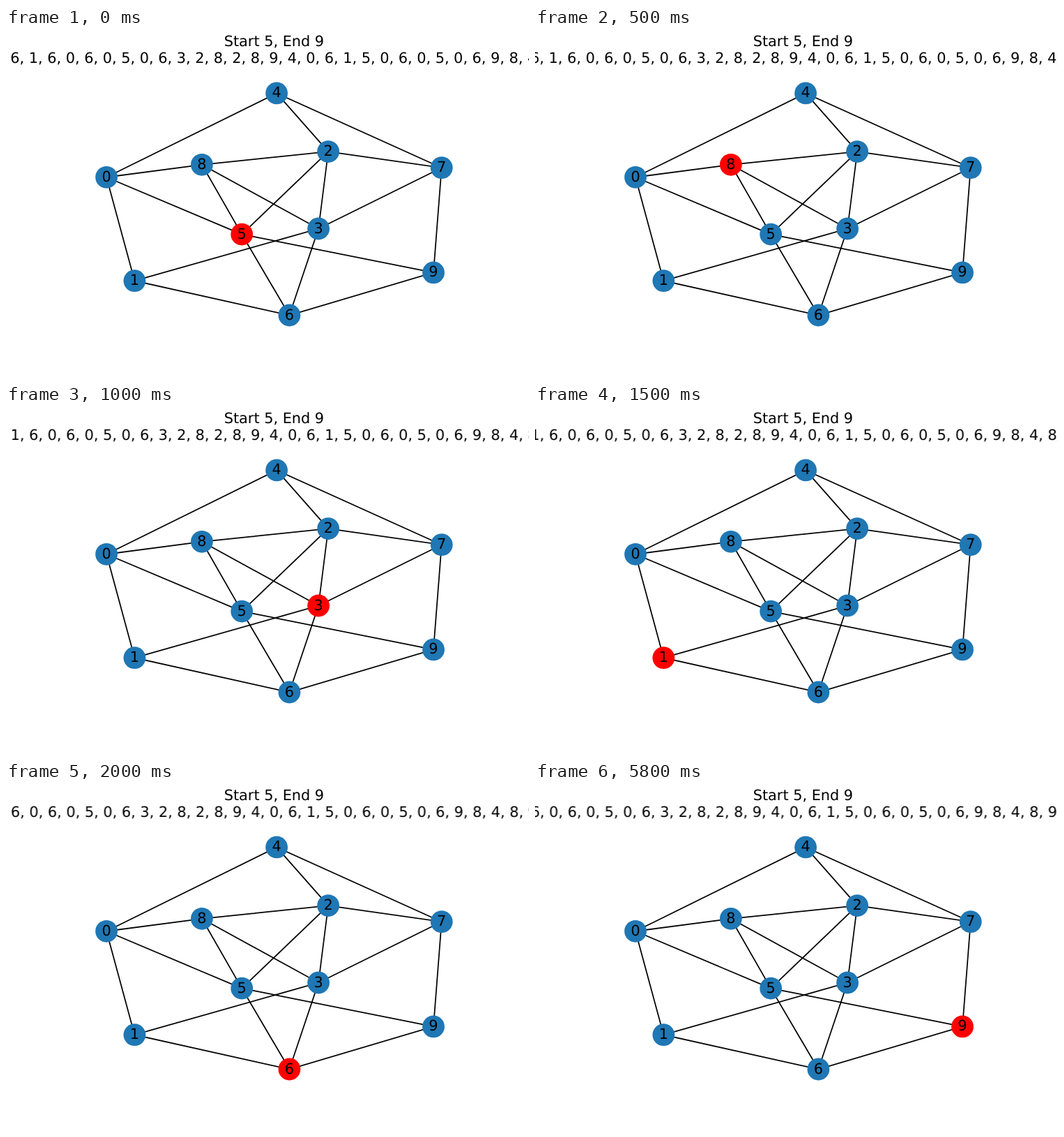
An HTML page for the animation above (8000 ms loop, 750 by 500 pixels).

```html
<!DOCTYPE html>
<html lang="en">
<head>
<meta charset="utf-8">
<title>Graph walk</title>
<style>
  html, body { margin: 0; width: 100%; height: 100%; overflow: hidden; background: #fff; }
  svg { display: block; width: 750px; height: 500px; overflow: hidden; }
  text { font: 20.833px "DejaVu Sans", sans-serif; text-rendering: geometricPrecision; }
  .mid { text-anchor: middle; }
  polyline { fill: none; stroke: #000; stroke-width: 1.736; }
  circle { fill: #1f77b4; }

  .visit { animation: visit 8s step-end infinite; }
  .arrive { animation: arrive 8s step-end infinite; }
  #path { animation: slide 8s infinite; }

  @keyframes visit {
    0% { fill: #f00; }
    6.25%, 100% { fill: #1f77b4; }
  }
  @keyframes arrive {
    0% { fill: #1f77b4; }
    31.25%, 100% { fill: #f00; }
  }
  /* the centred list grows by one entry per step, so it jumps half an entry left */
  @keyframes slide {
    0% { transform: translateX(0); animation-timing-function: steps(5, end); }
    31.25%, 100% { transform: translateX(-65.5px); }
  }
</style>
</head>
<body>
<svg viewBox="0 0 750 500">
  <text class="mid" x="384.4" y="26">Start 5, End 9</text>
  <text id="path" x="6.3" y="50">6, 1, 6, 0, 6, 0, 5, 0, 6, 3, 2, 8, 2, 8, 9, 4, 0, 6, 1, 5, 0, 6, 0, 5, 0, 6, 9, 8, 4, 8, 9</text>
  <g id="edges"></g>
  <g id="nodes"></g>
</svg>
<script>
  // key points: centre of each node, by its number
  const nodes = [
    [144.1, 213.8], [184.4, 362.2], [462.1, 177.1], [448.1, 287.5], [388.1, 93.4],
    [338.2, 295.6], [406.4, 411.5], [624.7, 200.2], [280.9, 195.8], [613, 350.4]
  ];
  // the outline, then trails that cover each inner edge once
  const trails = ['0479610', '428058325631', '273', '59'];
  const walk = '583169';

  function add(parent, tag, attrs) {
    const el = document.createElementNS('http://www.w3.org/2000/svg', tag);
    for (const key in attrs) el.setAttribute(key, attrs[key]);
    return document.getElementById(parent).appendChild(el);
  }

  for (const trail of trails) {
    add('edges', 'polyline', { points: [...trail].map(id => nodes[id]).join(' ') });
  }

  nodes.forEach(([cx, cy], id) => {
    const dot = add('nodes', 'circle', { cx, cy, r: 15.9 });
    const step = walk.indexOf(id);
    if (step >= 0) {
      const last = step === walk.length - 1;
      dot.classList.add(last ? 'arrive' : 'visit');
      if (!last) dot.style.animationDelay = step * 0.5 + 's';
    }
    add('nodes', 'text', { class: 'mid', x: cx, y: Math.round(cy + 6) }).textContent = id;
  });
</script>
</body>
</html>
```
